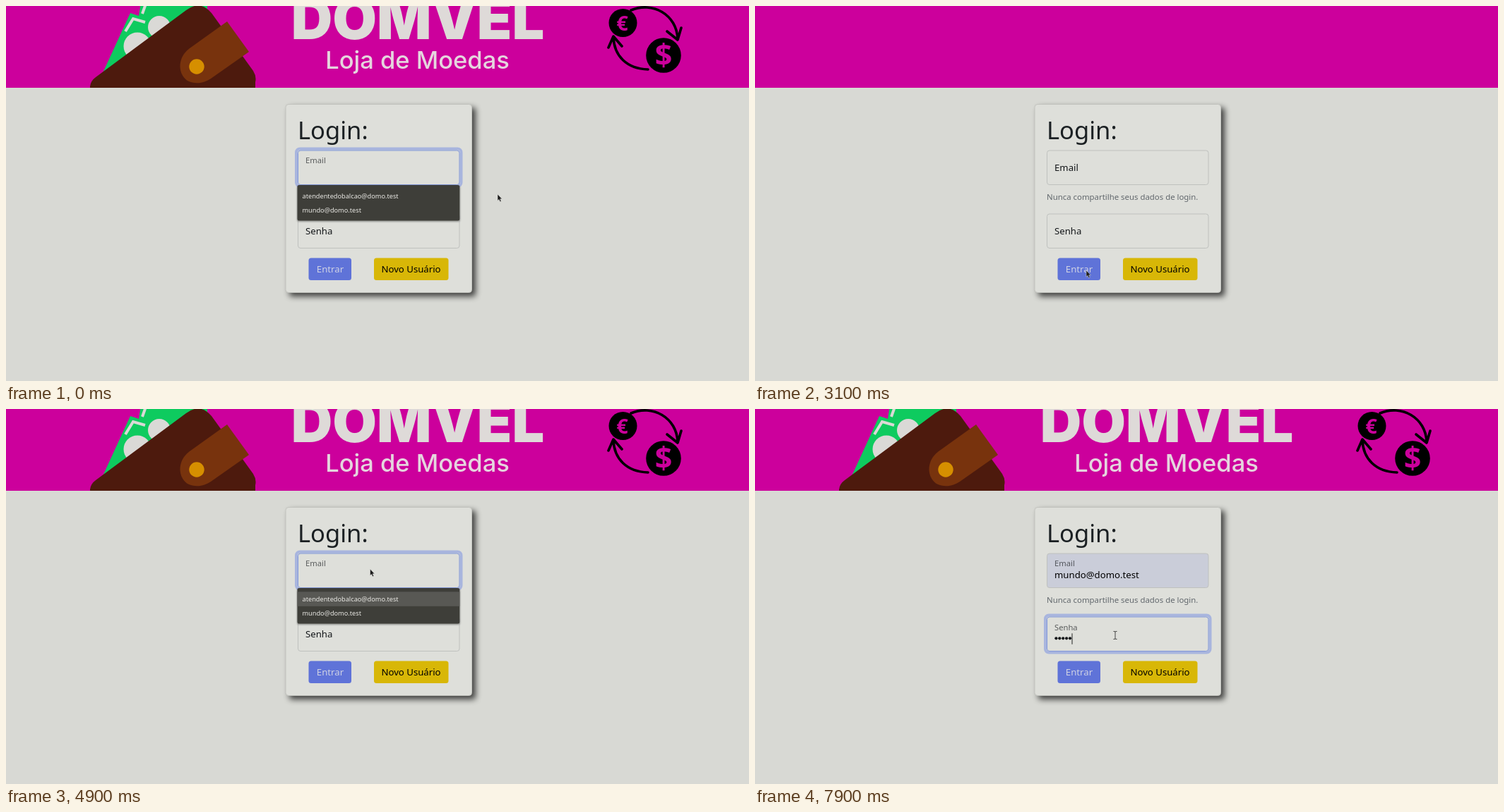
An HTML page for the animation above (8000 ms loop, 1052 px wide and 532 px high).

```html
<!DOCTYPE html>
<html lang="pt-BR">
<head>
<meta charset="utf-8">
<title>Login</title>
<style>
  html, body { margin: 0; width: 100%; height: 100%; overflow: hidden; background: #d8d9d4; }
  svg { display: block; font: 13.2px "Noto Sans", "Open Sans", sans-serif; fill: #14171a; }
  .brand { font-family: Inter, Roboto, sans-serif; text-anchor: middle; }
  .mid { text-anchor: middle; }
  .line { fill: none; stroke: #000; stroke-width: 3.6; stroke-linecap: round; stroke-linejoin: round; }
  .ring { fill: none; stroke: #a8b5de; stroke-width: 4; }
  .edge { fill: none; stroke: #bfc1be; }
  .caret { stroke: #222; }
</style>
</head>
<body>
<svg width="1052" height="532" viewBox="0 0 1052 532">
  <clipPath id="top"><rect width="1052" height="116"/></clipPath>
  <rect width="1052" height="532" fill="#d8d9d4"/>
  <rect width="1052" height="116" fill="#cc009c"/>

  <g clip-path="url(#top)">
    <g id="title"><text class="brand" x="583" y="47" font-size="81" font-weight="900" fill="#dedad8">DOMVEL</text></g>
    <g id="purse">
      <path fill="#0ecb5f" d="M136 97L176 10 188 14 195-30H285V8L140 110Z"/>
      <g fill="#dad9d6"><circle cx="186" cy="57" r="19.5"/><circle cx="217" cy="30" r="16"/></g>
      <path d="M169 36L180 18 197 23M193 11L199-6" fill="none" stroke="#dad9d6" stroke-width="4"/>
      <path fill="#4d1a0d" d="M119 150V114Q120 106 127 101L255 6Q275-9 291 10L350 92Q355 100 353 108V150Z"/>
      <path fill="#78330d" d="M313 22L260 60C241 74 244 98 257 106 269 112 281 109 290 103L344 65Z"/>
      <circle cx="270" cy="86" r="10.7" fill="#d68f00"/>
    </g>
    <g id="exchange">
      <circle cx="873.5" cy="24" r="20" fill="#000"/>
      <circle cx="931" cy="70" r="24.8" fill="#000"/>
      <g class="mid" fill="#cc009c" font-weight="600">
        <text x="872.5" y="34.5" font-size="29" font-weight="700">€</text>
        <text x="931" y="85" font-size="43">$</text>
      </g>
      <path class="line" d="M885 6C915-7 950 12 951 47M936 36L951 48 956 31M909 90C879 89 861 71 860 44M853 59L860 43 872 57"/>
    </g>
    <g id="tagline"><text class="brand" x="582.5" y="89" font-size="34.5" font-weight="500" fill="#e5d5de">Loja de Moedas</text></g>
  </g>

  <rect x="401" y="144" width="264" height="268" rx="4" fill="#000" opacity=".7" style="filter:blur(4px)"/>
  <rect x="396" y="139.5" width="263.5" height="267" rx="4" fill="#dedfda" stroke="#c2c3be"/>
  <text x="413" y="189" font-size="34.5" font-weight="500" fill="#1b2023">Login:</text>

  <rect id="emailRing" class="ring" x="411" y="202.5" width="233.5" height="53" rx="5"/>
  <rect id="emailBox" x="413.5" y="205" width="228.5" height="48.5" rx="3.5" class="edge"/>
  <text id="emailLabel">Email</text>
  <text id="email" x="424" y="240" fill="#000">mundo@domo.test</text>
  <text x="413" y="275" font-size="11.4" fill="#62686d">Nunca compartilhe seus dados de login.</text>

  <rect id="passRing" class="ring" x="411" y="292.5" width="233.5" height="53" rx="5"/>
  <rect id="passBox" x="413.5" y="295" width="228.5" height="48.5" rx="3.5" class="edge"/>
  <text id="passLabel">Senha</text>
  <g id="dots"></g>
  <path id="caret" class="caret" d="M.5 0V15.5"/>

  <rect id="enter" x="428.5" y="357.5" width="60.5" height="31.5" rx="3.5"/>
  <text class="mid" x="459" y="378" fill="#cfd2e4">Entrar</text>
  <rect x="521" y="357.5" width="105.5" height="31.5" rx="3.5" fill="#d8b707"/>
  <text class="mid" x="573.5" y="378" fill="#000">Novo Usuário</text>

  <g id="menu" font-size="9.2" font-weight="500" fill="#eae9e5">
    <rect x="412" y="255" width="231" height="51" rx="3" fill="#000" opacity=".35" style="filter:blur(1px)"/>
    <rect x="412.5" y="254" width="229.8" height="50.5" rx="2.5" fill="#3e3e39"/>
    <rect id="hover" x="412.5" width="229.8" height="20.5" fill="#585854"/>
    <text x="419.5" y="272.7">atendentedobalcao@domo.test</text>
    <text x="419.5" y="293.3">mundo@domo.test</text>
  </g>

  <path id="arrow" d="M0 0V9.2L2 7.4 3.6 10.8 5.2 10 3.7 6.8H6.4Z" fill="#1c1c1c" stroke="#e8e8e4" stroke-width=".5"/>
  <path id="beam" d="M-2.5-5.5H-1Q0-5.5 0-4.5 0-5.5 1-5.5H2.5M0-4.5V4.5M-2.5 5.5H-1Q0 5.5 0 4.5 0 5.5 1 5.5H2.5" fill="none" stroke="#444"/>
</svg>

<script>
const LOOP = 8000, STEP = 100;
const el = Object.fromEntries([...document.querySelectorAll('[id]')].map(e => [e.id, e]));
const clamp = v => Math.max(0, Math.min(1, v));
const smooth = v => (v = clamp(v)) * v * (3 - 2 * v);
const mix = (a, b, p) => a + (b - a) * p;
const show = (e, on) => e.setAttribute('visibility', on ? 'visible' : 'hidden');
const place = (e, x, y, scale = 1) => e.setAttribute('transform', `translate(${x} ${y}) scale(${scale})`);

// banner parts rise and fade in, each from its own start time
const banner = { title: 0, purse: 200, exchange: 465, tagline: 950 };
const BANNER_LOOP = 3000, RISE = 590;

// pointer: time, x, y
const route = [
  [0, 696, 267], [350, 645, 312], [700, 490, 328], [1000, 490, 328], [1700, 469, 375],
  [3100, 469, 375], [3800, 515, 225], [4400, 515, 225], [4500, 515.5, 227], [5000, 515.5, 227],
  [5400, 514, 288], [5600, 514, 290], [5900, 510, 321], [LOOP, 510, 321]
];
const BLUR = 2000, FOCUS = 4400, PICK = 5500, NEXT = 6200;
const keys = [7100, 7300, 7500, 7700, 7900];

for (let i = 0; i < keys.length; i++)
  el.dots.insertAdjacentHTML('beforeend', `<circle cx="${426.4 + i * 4.9}" cy="325.3" r="2.1"/>`);

function pointer(t) {
  const i = route.findIndex(k => k[0] > t);
  const [t0, x0, y0] = route[i - 1], [t1, x1, y1] = route[i];
  const p = smooth((t - t0) / (t1 - t0));
  return [mix(x0, x1, p), mix(y0, y1, p)];
}

function label(e, y, p) {
  place(e, 424, y - 10.2 * p, 1 - .15 * p);
  e.setAttribute('opacity', 1 - .35 * p);
}

function field(ring, box, p, fill) {
  ring.setAttribute('opacity', p);
  box.style.stroke = p > .5 ? '#8197d8' : '';
  box.style.fill = fill;
}

function render(t) {
  const phase = (t - 100 + BANNER_LOOP) % BANNER_LOOP;
  for (const id in banner) {
    const p = smooth((phase - banner[id]) / RISE);
    place(el[id], 0, 26 * (1 - p));
    el[id].setAttribute('opacity', p);
  }

  const since = start => clamp((t - start + 30) / 100);
  const floated = 1 - since(BLUR) + since(FOCUS);
  const pass = since(NEXT);
  const filled = t >= PICK;
  const typed = keys.filter(k => k <= t).length;
  const menu = t < BLUR || (t >= FOCUS + 100 && t < PICK);

  field(el.emailRing, el.emailBox, floated - pass, filled ? '#cacdd9' : '#dedfda');
  field(el.passRing, el.passBox, pass, '#dedfda');
  label(el.emailLabel, 233.5, floated);
  label(el.passLabel, 323.7, pass);
  show(el.email, filled);
  [...el.dots.children].forEach((d, i) => show(d, i < typed));

  const flash = [BLUR, FOCUS, NEXT].includes(t);
  el.enter.setAttribute('fill', flash ? '#6f50d6' : '#5f73d8');

  // the caret blinks every half second and stays lit while typing
  const active = t < BLUR || t >= FOCUS;
  const begin = t < BLUR ? 500 : t < PICK ? FOCUS : t < NEXT ? PICK : NEXT;
  const lit = t >= begin && (typed > 0 || (t - begin) % 1000 < 500);
  show(el.caret, active && lit);
  if (t >= NEXT) place(el.caret, 424 + typed * 4.9, 318.3);
  else place(el.caret, filled ? 543 : 424, 228.3);

  show(el.menu, menu);
  show(el.hover, menu && t >= 4900);
  el.hover.setAttribute('y', t < 5200 ? 259.3 : 279.8);

  const [x, y] = pointer(t);
  const overText = x > 413 && x < 642 &&
    ((y > 204 && y < 254 && !menu) || (y > 304 && y < 344));
  place(el.arrow, x, y);
  place(el.beam, x, y);
  show(el.arrow, !overText);
  show(el.beam, overText);
}

const start = performance.now();
function tick(now) {
  const t = Math.max(0, now - start) % LOOP;
  render(Math.floor(t / STEP) * STEP);
  requestAnimationFrame(tick);
}
render(0);
requestAnimationFrame(tick);
</script>
</body>
</html>
```
